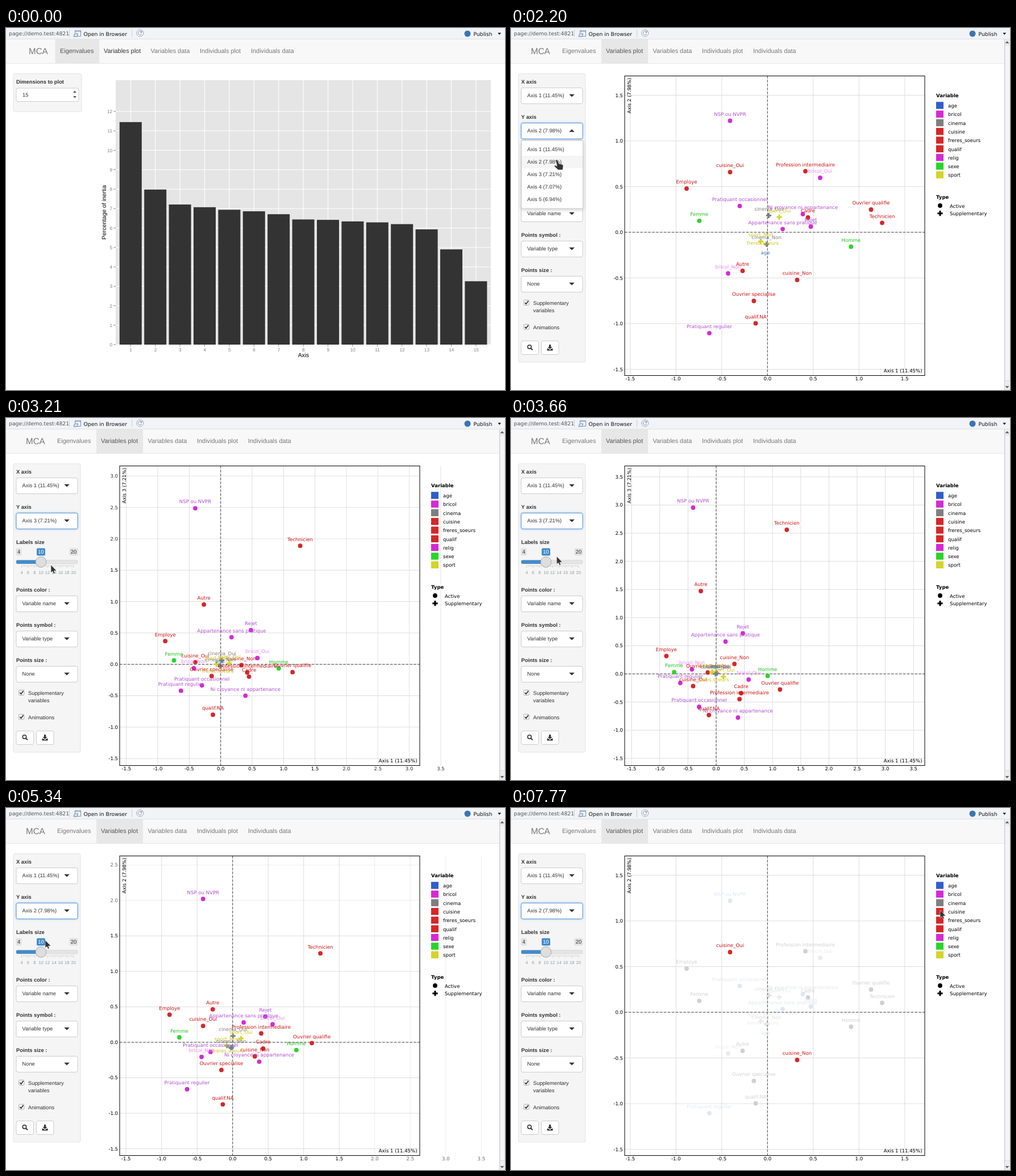
Write an HTML page that moves like this. It is 878 px wide and 638 px high and loops after 8 s.

```html
<!DOCTYPE html>
<html lang="en">
<head>
<meta charset="utf-8">
<title>MCA results</title>
<style>
  html, body { margin: 0; width: 100%; height: 100%; overflow: hidden; background: #fff; }
  svg { display: block; width: 878px; height: 638px; }
  text { white-space: pre; text-rendering: geometricPrecision; }
  .ui { font: 9.33px "Liberation Sans", sans-serif; fill: #333; }
  .nav { font-size: 10.9px; fill: #777; }
  .bar { font: 9.28px "DejaVu Sans", sans-serif; fill: #111; }
  .plot { font: 8.56px "DejaVu Sans", sans-serif; fill: #000; }
  .bold { font-weight: bold; }
  .mid { text-anchor: middle; }
  .end { text-anchor: end; }
  .box { fill: #fff; stroke: #ccc; }
  .well { fill: #f5f5f5; stroke: #e3e3e3; }
  .focus { stroke: #5a94d6; filter: drop-shadow(0 0 2px #66afe999); }
</style>
</head>
<body>
<svg id="stage" viewBox="0 0 878 638"></svg>
<script>
const stage = document.getElementById('stage');
const LOOP = 8000;
const AXES = ['Axis 1 (11.45%)', 'Axis 2 (7.98%)', 'Axis 3 (7.21%)', 'Axis 4 (7.07%)', 'Axis 5 (6.94%)'];

const RED = '#d62728', MAGENTA = '#d42ad6';
// variable: [mark colour, label colour, faded colour]
const VARIABLES = {
  age: ['#2f5fcb', '#3a78b8', '#dce7f5'],
  bricol: [MAGENTA, '#ec84ee', '#ebebeb'],
  cinema: ['#7f7f7f', '#7f7f7f', '#dedede'],
  cuisine: [RED, '#cc1010', '#d0d0d0'],
  freres_soeurs: [RED, '#cdc41c', '#ebebeb'],
  qualif: [RED, '#cc1010', '#d0d0d0'],
  relig: [MAGENTA, '#b04ed2', '#dfe7f2'],
  sexe: ['#2ad42a', '#18c018', '#d0d0d0'],
  sport: ['#d4d42a', '#cdc41c', '#ebebeb']
};

// label, variable, x and y on axes 1/2, y on axes 1/3, mark (default: dot)
const POINTS = [
  ['NSP ou NVPR', 'relig', 385.5, 163.5, 158],
  ['cuisine_Oui', 'cuisine', 385.5, 254, 472.5],
  ['Profession intermediaire', 'qualif', 518, 252.5, 495.5],
  ['bricol_Oui', 'bricol', 544, 264, 461],
  ['Employe', 'qualif', 309, 283, 419.5],
  ['Ouvrier qualifie', 'qualif', 633.5, 320, 478.5],
  ['Technicien', 'qualif', 653, 343.3, 197],
  ['Pratiquant occasionnel', 'relig', 402.5, 313.7, 509],
  ['Ni croyance ni appartenance', 'relig', 513.5, 328, 528],
  ['Cadre', 'qualif', 522.5, 334, 485],
  ['Rejet', 'relig', 527.5, 350, 379.5],
  ['Appartenance sans pratique', 'relig', 478, 354.3, 394],
  ['Femme', 'sexe', 331.3, 339.8, 448],
  ['Homme', 'sexe', 598.3, 385.5, 454.5],
  ['bricol_Non', 'bricol', 382, 432.5, 443],
  ['Autre', 'qualif', 407.5, 428, 305],
  ['cuisine_Non', 'cuisine', 503.5, 444, 433.5],
  ['Ouvrier specialise', 'qualif', 427.3, 481, 448.5],
  ['qualif.NA', 'qualif', 430.5, 520.5, 523.5],
  ['Pratiquant regulier', 'relig', 349, 537.8, 467],
  ['cinema_Oui', 'cinema', 453.5, 330.5, 450, 'cross'],
  ['sport_Oui', 'sport', 472, 333.3, 456, 'cross'],
  ['sport_Non', 'sport', 439.5, 376, 448, 'cross'],
  ['cinema_Non', 'cinema', 449.5, 381, 451, 'cross'],
  ['freres.soeurs', 'freres_soeurs', 443, 391, 473, 'none'],
  ['age', 'age', 447.5, 407.5, 448.5, 'none']
];

// time, x, y of the pointer tip
const POINTER = [
  [460, 205, 40], [1300, 205, 40], [1500, 100, 181], [2000, 100, 181], [2180, 80, 233],
  [2220, 80, 233], [2340, 79, 259], [3620, 79, 259], [3830, 86, 182], [4360, 86, 182],
  [4540, 66, 233], [4880, 66, 233], [4900, 69, 233], [5700, 69, 233], [6010, 275, 205],
  [6390, 755, 157], [6440, 755, 157], [6500, 755, 149], [7290, 755, 149], [7400, 755, 180]
];

const mix = (a, b, k) => a + (b - a) * k;
const ramp = (t, start, length) => Math.min(1, Math.max(0, (t - start) / length));
const ease = k => k < .5 ? 4 * k ** 3 : 1 - 4 * (1 - k) ** 3;
const between = (t, a, b) => t >= a && t < b;

const text = (x, y, s, cls = 'ui', more = '') => `<text x="${x}" y="${y}" class="${cls}" ${more}>${s}</text>`;
const rect = (x, y, w, h, more = '') => `<rect x="${x}" y="${y}" width="${w}" height="${h}" ${more}/>`;
const circle = (x, y, r, more = '') => `<circle cx="${x}" cy="${y}" r="${r}" ${more}/>`;
const path = (d, more = '') => `<path d="${d}" ${more}/>`;
const each = (n, fn) => Array.from({ length: n }, (_, i) => fn(i)).join('');
const CROSS = 'M-4.6-1.5h3.1v-3.1h3v3.1h3.1v3h-3.1v3.1h-3v-3.1h-3.1z';
const DOT = 'M-3.9 0a3.9 3.9 0 1 0 7.8 0a3.9 3.9 0 1 0-7.8 0z';

function topBar() {
  return rect(0, 0, 878, 19, 'fill="#f1f3f6"') + path('M0 19.5H878', 'stroke="#dfe1e5"') +
    text(5, 13, 'page://demo.test:4821', 'bar', 'style="fill:#555"') +
    path('M111.5 3V16M221.5 3V16', 'stroke="#c8ccd2"') +
    path('M121.5 9V4.5H131.5V14.5H125M121.5 6.5H131.5', 'fill="#fff" stroke="#6f8fb3"') +
    path('M119 15L121 10H127L125 15Z', 'fill="#dfeaf6" stroke="#5b7fa8"') +
    text(136.5, 13.5, 'Open in Browser', 'bar') +
    circle(235.8, 9, 6, 'fill="#fff" stroke="#93a3b8"') +
    path('M238.5 7A3.3 3.3 0 1 0 239 10M239 5V8H236', 'fill="none" stroke="#6d84a3"') +
    circle(812, 10, 5.5, 'fill="#3a74b5"') +
    text(822.5, 13.5, 'Publish', 'bar') + path('M865.5 8.5H871L868.2 12Z');
}

function navBar(shift, active, hover) {
  const tabs = [['Eigenvalues', 95], ['Variables plot', 172], ['Variables data', 254.5], ['Individuals plot', 341], ['Individuals data', 431]];
  const tabBox = active ? [159, 82] : [86.5, 77.5];
  const colour = i => i === active ? '#555' : i === hover ? '#333' : '#777';
  return rect(0, 20, 878, 42, 'fill="#f8f8f8"') + path('M0 62.5H878', 'stroke="#e7e7e7"') +
    rect(tabBox[0], 19.5, tabBox[1], 42.5, 'fill="#e7e7e7"') +
    text(40 + shift, 46, 'MCA', 'ui nav', 'style="font-size:15.2px"') +
    tabs.map(([s, x], i) => text(x + shift, 44.4, s, 'ui nav', `style="fill:${colour(i)}"`)).join('');
}

function eigenPage() {
  const values = [11.45, 7.98, 7.21, 7.07, 6.94, 6.86, 6.71, 6.44, 6.42, 6.34, 6.29, 6.2, 5.93, 4.9, 3.26];
  const cx = i => 219.3 + 43.4 * i, cy = v => 558 - 34.25 * v;
  return navBar(0, 0, 1) +
    rect(13, 80.5, 120, 67, 'rx="3" class="well"') +
    text(18, 97.7, 'Dimensions to plot', 'ui bold') +
    rect(18, 106, 110, 23.5, 'rx="3" class="box"') + text(29, 121, '15') +
    path('M118 114L121 110.5L124 114ZM118 120L121 123.5L124 120Z', 'fill="#555"') +
    rect(193, 92, 660, 466, 'fill="#e5e5e5"') +
    each(13, i => path(`M193 ${cy(i)}H853`, 'stroke="#fff" stroke-width="1.1"') +
      path(`M189.5 ${cy(i)}H193`, 'stroke="#7f7f7f"') +
      text(187, cy(i) + 3, i, 'ui end', 'style="font-size:8.2px;fill:#7f7f7f"')) +
    values.map((v, i) => path(`M${cx(i)} 92V558`, 'stroke="#fff" stroke-width="1.1"') +
      path(`M${cx(i)} 558V561.5`, 'stroke="#7f7f7f"') +
      rect(cx(i) - 19.5, cy(v), 39, 34.25 * v, 'fill="#333"') +
      text(cx(i) + .3, 570, i + 1, 'ui mid', 'style="font-size:8.2px;fill:#7f7f7f"')).join('') +
    text(523.5, 580, 'Axis', 'ui mid', 'style="font-size:10.4px;fill:#000"') +
    text(0, 0, 'Percentage of inertia', 'ui mid', 'transform="translate(175.5 325) rotate(-90)" style="font-size:10.4px;fill:#000"');
}

const select = (y, value, id = '') => rect(18, y - 13.5, 108, 28, `rx="3" class="box" id="${id}Box"`) +
  text(28.5, y + 3, value, 'ui', `id="${id}Value"`) +
  path('M-4.8-2.3H4.8L0 2.5Z', `transform="translate(107 ${y})" fill="#333" id="${id}Caret"`);

function slider() {
  const badge = (x, w, s, fill, ink) => rect(x, 229.5, w, 13, `rx="2" fill="${fill}"`) +
    text(x + w / 2, 239.3, s, 'ui mid', `style="fill:${ink}"`);
  return badge(17.5, 10, 4, '#e1e1e1', '#333') + badge(111.5, 15, 20, '#e1e1e1', '#333') +
    badge(54, 15, 10, '#428bca', '#fff') +
    rect(18, 250.5, 108, 6.5, 'rx="2" fill="#e4e4e4" stroke="#d2d2d2" stroke-width=".6"') +
    rect(18, 250.5, 44, 6.5, 'rx="2" fill="#428bca"') +
    each(33, i => path(`M${27.5 + 2.85 * i} 259v${i % 4 ? 3 : 5}`, 'stroke="#b9bec4" stroke-width=".7"')) +
    each(9, i => text(27.5 + 11.4 * i, 275.3, 4 + 2 * i, 'ui mid', 'style="font-size:7.6px;fill:#8f9bab"')) +
    circle(61.5, 253.8, 9.3, 'fill="#dedede" stroke="#aaa"');
}

function sidebar() {
  const heading = (y, s) => text(18, y, s, 'ui bold');
  const check = y => rect(22.7, y - 4.5, 9, 9, 'rx="1" class="box" style="stroke:#aaa"') +
    path(`M24.5 ${y}l2 2.5l4-5.5`, 'fill="none" stroke="#222" stroke-width="1.6"');
  const button = x => rect(x, 551.5, 30.5, 24, 'rx="3" class="box"');
  return rect(13, 80.5, 118, 508.5, 'rx="3" class="well"') +
    heading(97.5, 'X axis') + select(119, AXES[0]) +
    heading(160, 'Y axis') + select(181, AXES[1], 'y') +
    heading(221.7, 'Labels size') + slider() +
    heading(305.8, 'Points color :') + select(327, 'Variable name') +
    heading(368, 'Points symbol :') + select(389, 'Variable type') +
    heading(430, 'Points size :') + select(451, 'None') +
    check(484) + text(39, 488.3, 'Supplementary') + text(39, 501, 'variables') +
    check(526.7) + text(39, 530.8, 'Animations') +
    button(18) + button(53.5) +
    circle(32.5, 562, 3.2, 'fill="none" stroke="#333" stroke-width="1.6"') +
    path('M35 564.5L38 567.5', 'stroke="#333" stroke-width="2"') +
    path('M67 558h3v4h2.5l-4 4l-4-4h2.5zM63.5 565h2l3 2.5l3-2.5h2v3.5h-10z', 'fill="#333"') +
    '<g id="menu">' + rect(18.5, 198.5, 108, 119.5, 'fill="#fff" stroke="#d0d0d0" style="filter:drop-shadow(0 2px 3px #0003)"') +
    rect(19, 0, 107, 22, 'fill="#f5f5f5" id="option"') +
    AXES.map((s, i) => text(28.5, 216.5 + 22 * i, s)).join('') + '</g>';
}

function scatter() {
  const ticks = each(11, i => {
    const s = (i / 2 - 1.5).toFixed(1);
    return '<g class="xTick">' + path('M0 84.5V613', 'stroke="#ddd"') + text(0, 620.7, s, 'plot mid') + '</g>' +
      '<g class="yTick">' + path('M200 0H728', 'stroke="#ddd"') + text(197, 3, s, 'plot end') + '</g>';
  });
  const dash = 'stroke="#444" stroke-dasharray="4.3 2.6"';
  return `<clipPath id="area">${rect(135, 83, 718, 555)}</clipPath><g clip-path="url(#area)">${ticks}</g>` +
    path('M0 84.5V613', dash + ' id="zeroX"') + path('M200 0H728', dash + ' id="zeroY"') +
    rect(200, 84.5, 528, 528, 'fill="none" stroke="#000"') +
    text(723.5, 607.3, AXES[0], 'plot end') +
    text(0, 0, '', 'plot end', 'id="yTitle" transform="translate(211 88) rotate(-90)"') +
    POINTS.map(p => path(p[5] === 'none' ? '' : p[5] ? CROSS : DOT, 'class="mark"')).join('') +
    POINTS.map(p => text(0, -8.6, p[0], 'plot mid label')).join('');
}

function legend() {
  return text(748, 122, 'Variable', 'plot bold') +
    Object.entries(VARIABLES).map(([name, [fill]], i) =>
      rect(748, 130.2 + 15.3 * i, 13, 12.4, `fill="${fill}"`) + text(769, 140 + 15.3 * i, name, 'plot')).join('') +
    text(748, 300.7, 'Type', 'plot bold') +
    path(DOT, 'transform="translate(755 313)"') + text(772, 316.7, 'Active', 'plot') +
    path(CROSS, 'transform="translate(755 326.7)"') + text(772, 330.3, 'Supplementary', 'plot');
}

function scrollBar() {
  return rect(868, 20, 10, 618, 'fill="#ededf1"') + path('M868.5 20V638', 'stroke="#c4c6cc"') +
    rect(869, 30, 9, 591.5, 'fill="#f5f5f8" stroke="#cfd1d6" stroke-width=".8"') +
    path('M869.5 27h7l-3.5-4zM869.5 631h7l-3.5 4z', 'fill="#666"');
}

stage.innerHTML = topBar() +
  `<g id="eigen">${eigenPage()}</g>` +
  `<g id="variables">${navBar(-5, 1)}${scatter()}${legend()}${sidebar()}${scrollBar()}</g>` +
  '<g id="pointer" fill="#333" stroke="#fff" stroke-width=".5">' +
  path('M0 0V13.5L3 11L5 15.5L7.2 14.5L5.5 10.3L9.8 10Z', 'id="arrow"') +
  path('M-1 .8C-1.5-1 1.5-1.5 2.2 .5L4 6L10 7.5C12 8 12 10 11.7 12L11 17H3L-3 11.5C-4.5 9.5-2.5 8-1 9.5L1 10.5Z', 'id="hand"') +
  '</g>';

const byId = Object.fromEntries([...stage.querySelectorAll('[id]')].map(e => [e.id, e]));
const all = cls => [...stage.getElementsByClassName(cls)];
const [marks, labels, xTicks, yTicks] = ['mark', 'label', 'xTick', 'yTick'].map(all);
const show = (id, on) => byId[id].setAttribute('display', on ? 'inline' : 'none');
const move = (e, x, y) => e.setAttribute('transform', `translate(${x} ${y})`);

function pointerAt(t) {
  const next = POINTER.findIndex(p => p[0] > t);
  if (next === 0) return POINTER[0].slice(1);
  if (next < 0) return POINTER.at(-1).slice(1);
  const [t0, x0, y0] = POINTER[next - 1], [t1, x1, y1] = POINTER[next];
  const k = ramp(t, t0, t1 - t0);
  return [mix(x0, x1, k), mix(y0, y1, k)];
}

// 0 on axes 1/2, 1 on axes 1/3
const TO_THIRD = 2575, TO_SECOND = 4875;
const morphAt = t => ease(ramp(t, TO_THIRD, 1000)) - ease(ramp(t, TO_SECOND, 1000));

function fadeAt(t, variable) {
  const enter = ramp(t, 6460, 200), swap = ramp(t, 7370, 250);
  if (variable === 'bricol') return swap;
  return variable === 'cuisine' ? enter - swap : enter;
}

function drawPlot(t) {
  // the axes run a few milliseconds ahead of the points
  const axes = morphAt(t + 5), k = morphAt(t);
  const x0 = mix(451.3, 361, axes), y0 = mix(360, 451, axes), unit = mix(161, 99.2, axes);
  xTicks.forEach((tick, i) => {
    const v = i / 2 - 1.5, opacity = v > 1.5 ? axes : 1;
    move(tick, x0 + v * unit, 0);
    move(yTicks[i], 0, y0 - v * unit);
    tick.setAttribute('opacity', opacity);
    yTicks[i].setAttribute('opacity', opacity);
  });
  move(byId.zeroX, x0, 0);
  move(byId.zeroY, 0, y0);
  byId.yTitle.textContent = AXES[between(t, TO_THIRD, TO_SECOND) ? 2 : 1];
  POINTS.forEach(([, variable, x, y, yThird], i) => {
    const px = mix(x, 361 + (x - 451.3) * 99.2 / 161, k), py = mix(y, yThird, k);
    const [fill, ink, faded] = VARIABLES[variable], fade = fadeAt(t, variable) * 100;
    move(marks[i], px, py);
    move(labels[i], px, py);
    marks[i].style.fill = `color-mix(in srgb, ${faded} ${fade}%, ${fill})`;
    labels[i].style.fill = `color-mix(in srgb, ${faded} ${fade}%, ${ink})`;
  });
}

function drawMenu(t, pointerY) {
  const open = between(t, 1540, 2400) || between(t, 3860, 4600);
  const selected = between(t, 2400, 4600) ? 2 : 1;
  const active = pointerY < 203 ? selected : Math.floor((pointerY - 203) / 22);
  show('menu', open);
  byId.option.setAttribute('y', 203 + 22 * active);
  byId.yValue.textContent = AXES[selected];
  byId.yBox.classList.toggle('focus', t >= 1540);
  byId.yCaret.setAttribute('transform', `translate(107 181) scale(1 ${open ? -1 : 1})`);
}

function draw() {
  const t = performance.now() % LOOP, started = t >= 460;
  const [x, y] = pointerAt(t);
  const hand = t < 2400 || between(t, 3740, 4890);
  show('eigen', !started);
  show('variables', started);
  show('pointer', started);
  show('hand', hand);
  show('arrow', !hand);
  move(byId.pointer, x, y);
  drawPlot(t);
  drawMenu(t, y);
  requestAnimationFrame(draw);
}
draw();
</script>
</body>
</html>
```
